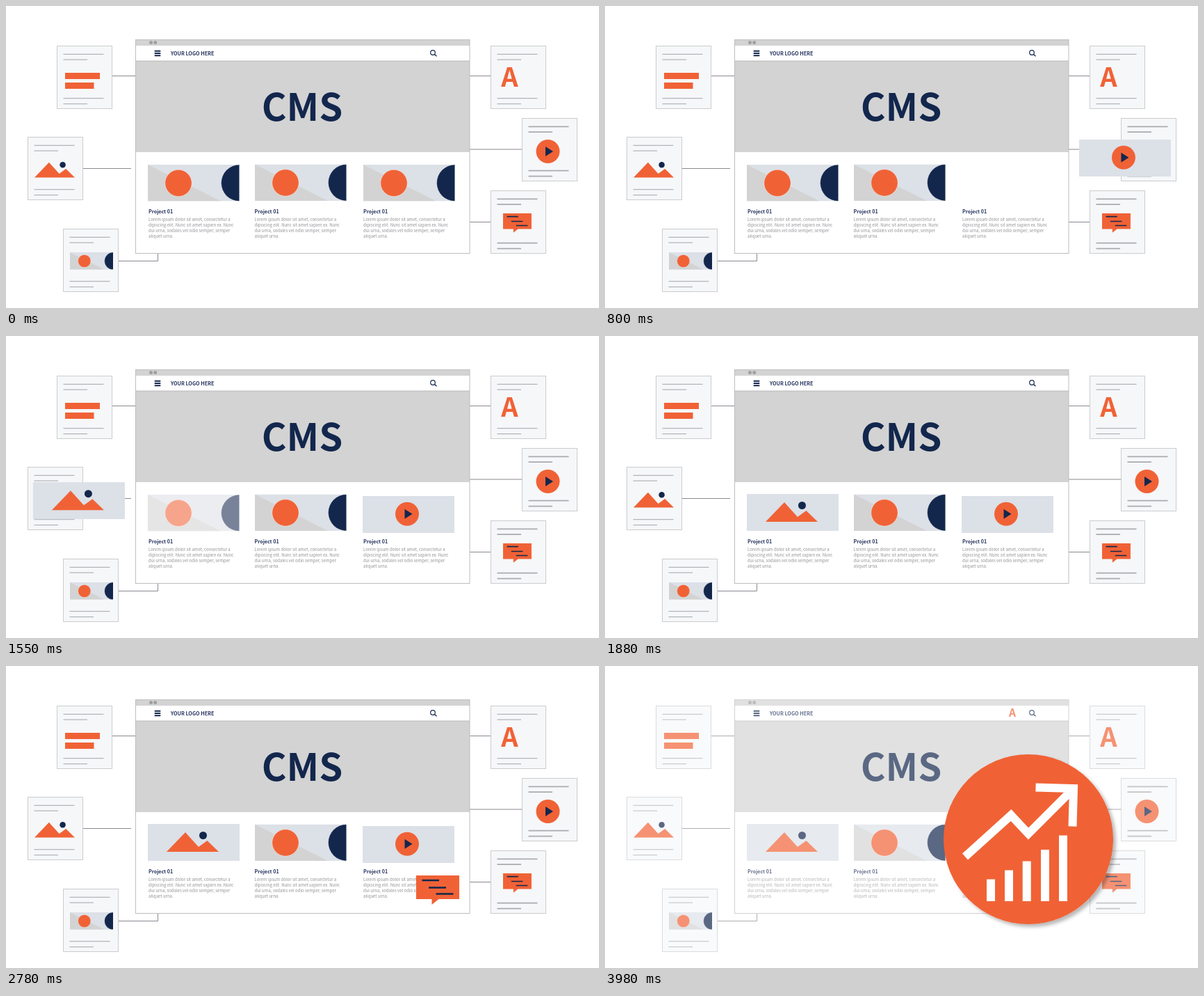
An HTML page that plays this animation: 853 px wide and 434 px high, repeating every 5010 ms.

```html
<!DOCTYPE html>
<html lang="en">
<head>
<meta charset="utf-8">
<title>CMS modules</title>
<style>
  html, body { margin: 0; width: 100%; height: 100%; overflow: hidden; background: #fff; }
  svg { display: block; width: 100%; height: 100%; }
  text { font-family: "Noto Sans CJK JP", "Noto Sans CJK SC", "Noto Sans CJK KR", "Noto Sans CJK", "Open Sans", sans-serif; }
  .bold { font-weight: 700; }
  .orange { fill: #f06236; }
  .navy { fill: #13274d; }
  .grey { fill: #d3d3d3; }
  .pale { fill: #dce0e7; }
  .ink { stroke: #13274d; fill: none; }
  .wire { stroke: #8b8890; fill: none; }
  .body { font-size: 6px; fill: #8f9094; }
  .name { font-size: 7.1px; fill: #26345f; }
</style>
</head>
<body>
<svg viewBox="0 0 853 434" preserveAspectRatio="none">
  <defs>
    <clipPath id="frame"><rect width="131.5" height="52.5"/></clipPath>
    <filter id="shadow" x="-10%" y="-10%" width="125%" height="125%">
      <feDropShadow dx="4" dy="4" stdDeviation="2.5" flood-color="#000" flood-opacity=".28"/>
    </filter>

    <g id="module" clip-path="url(#frame)">
      <rect class="pale" width="131.5" height="52.5"/>
      <path class="grey" d="M0 0L105 52.5H0z"/>
      <g stroke="#fff" stroke-opacity=".4">
        <circle class="orange" cx="44" cy="26.5" r="19.2"/>
        <circle class="navy" cx="131.8" cy="26.3" r="26.3"/>
      </g>
    </g>
    <g id="peaks">
      <path class="orange" d="M0 28L27 0L46 21L58.500 12L75 28z"/>
      <circle class="navy" cx="52.500" cy="4.500" r="5.500"/>
    </g>
    <g id="play">
      <circle class="orange" r="17"/>
      <path class="navy" d="M-3.500 -7L7.500 0L-3.500 7z"/>
    </g>
    <g id="bubble">
      <path class="orange" d="M0 0H62V34H32.500L22.500 42V34H0z"/>
      <path class="ink" stroke-width="2.400" d="M8.500 7H33M18 17.500H43M28.500 26.500H53.500"/>
    </g>
  </defs>

  <rect width="853" height="434" fill="#fff"/>
  <path class="wire" d="M153 100.500H186M111 233.500H180M162 366.500H218.500V355M667 100.500H697M667 206H742M667 310.500H697"/>

  <g id="window">
    <rect x="186.500" y="48.500" width="480.500" height="307" fill="#fff"/>
    <rect class="grey" x="186" y="48" width="481" height="9"/>
    <circle cx="208.500" cy="52.500" r="2.500" fill="#a0a0a1"/>
    <circle cx="214.700" cy="52.500" r="2.500" fill="#a0a0a1"/>
    <rect class="grey" x="186" y="79" width="481" height="131"/>
    <path d="M186 79H667" stroke="#b9b9ba"/>
    <rect x="186.500" y="48.500" width="480.500" height="307" fill="none" stroke="#bdbdbf"/>
    <path class="ink" stroke-width="2" d="M213.700 64.800H222.300M213.700 68H222.300M213.700 71.200H222.300"/>
    <text class="bold" x="237" y="70.500" font-size="7.2" fill="#26345f">YOUR LOGO HERE</text>
    <circle class="ink" cx="614" cy="67" r="3.300" stroke-width="1.200"/>
    <path class="ink" stroke-width="1.300" d="M616.500 69.500L619.500 72.300"/>
    <text class="bold navy" x="426" y="165" font-size="54.6" text-anchor="middle">CMS</text>
  </g>

  <g id="projects"></g>
  <g id="pages"></g>

  <use href="#bubble" transform="translate(715 298) scale(.66)"/>
  <use href="#play" x="779.500" y="209"/>
  <use href="#peaks" transform="translate(41 224.800) scale(.773)"/>
  <use href="#module" transform="translate(92 354) scale(.4715)"/>
  <path class="orange" d="M85 96H135V105H85zM85 110H126.500V119H85z"/>
  <text class="bold orange" x="724.500" y="116" font-size="38" text-anchor="middle">A</text>

  <g id="video">
    <rect class="pale" width="132" height="53"/>
    <use href="#play" x="64" y="25.700"/>
  </g>
  <g id="image">
    <rect class="pale" width="132" height="53"/>
    <use href="#peaks" x="27" y="12"/>
  </g>
  <g id="comment"><use href="#bubble"/></g>
  <g id="letter"><text class="bold orange" y="5.500" font-size="15.5" text-anchor="middle">A</text></g>

  <rect id="veil" width="853" height="434" fill="#fff" opacity=".3"/>
  <g id="growth">
    <circle class="orange" cx="609" cy="249" r="122" filter="url(#shadow)"/>
    <path fill="#fff" d="M549 306.500h12V338h-12zM575 293.500h12V338h-12zM600.700 280.500h12V338h-12zM627 264h12V338h-12zM653 243.500h12V338h-12z"/>
    <path fill="none" stroke="#fff" stroke-width="12" d="M518 274L584 214.500L609 241L672 178M619.500 174.500L674 176L672.500 230.500"/>
  </g>
</svg>
<script>
const LOOP = 5010;
const byId = id => document.getElementById(id);

const COPY = [
  "Lorem ipsum dolor sit amet, consectetur a",
  "dipiscing elit. Nunc sit amet sapien ex. Nunc",
  "dui urna, sodales vel odio semper, semper",
  "aliquet urna."
];

// Project columns: picture x, picture y, text x
const columns = [[204, 228, 205], [358, 227.5, 357.5], [514, 228, 514]];
byId("projects").innerHTML = columns.map(([x, y, tx], i) =>
  `<use id="pic${i}" href="#module" x="${x}" y="${y}"/>` +
  `<text class="bold name" x="${tx}" y="297.5">Project 01</text>` +
  COPY.map((line, n) => `<text class="body" x="${tx}" y="${308.5 + 8 * n}">${line}</text>`).join("")
).join("");

// Side pages: x, y, heavy lines
const sheets = [[73, 57], [31, 188], [82, 320], [697, 57], [742, 161, true], [697, 265, true]];
byId("pages").innerHTML = sheets.map(([x, y, heavy]) =>
  `<g transform="translate(${x} ${y})">` +
  `<rect x=".5" y=".5" width="79" height="90" fill="#f6f7f9" stroke="#cbccce"/>` +
  `<path stroke="${heavy ? "#a9abae" : "#b2b5b8"}" stroke-width="${heavy ? 1.8 : 1.2}" ` +
  `d="M9.500 12.300H67.500M9.500 20.200H44M9.500 75.600H67.500M9.500 83.600H44"/></g>`
).join("");

// Travelling parts: first shown, motion start, motion end, from, to
const trips = [
  { el: byId("video"), show: 640, start: 645, end: 1205, from: [713, 185], to: [513, 230] },
  { el: byId("image"), show: 1400, start: 1421, end: 1884, from: [8, 207], to: [204, 227] },
  { el: byId("comment"), show: 2350, start: 2350, end: 2780, from: [708, 294], to: [590, 301] },
  { el: byId("letter"), show: 2950, start: 2950, end: 3350, from: [711, 103.5], to: [586, 67.5] }
];

const ramp = (t, a, b) => Math.min(1, Math.max(0, (t - a) / (b - a)));
const ease = p => p < .5 ? 2 * p * p : 1 - 2 * (1 - p) * (1 - p);
const show = (el, on) => el.setAttribute("visibility", on ? "visible" : "hidden");

function draw(t) {
  byId("pic2").setAttribute("opacity", 1 - ramp(t, 340, 760));
  byId("pic0").setAttribute("opacity", 1 - ramp(t, 1370, 1790));
  for (const { el, show: at, start, end, from, to } of trips) {
    const p = ease(ramp(t, start, end));
    const [x, y] = from.map((v, i) => v + (to[i] - v) * p);
    el.setAttribute("transform", `translate(${x.toFixed(2)} ${y.toFixed(2)})`);
    show(el, t >= at);
  }
  show(byId("veil"), t >= 3680);
  show(byId("growth"), t >= 3980);
}

const began = performance.now();
function tick() {
  draw((performance.now() - began) % LOOP);
  requestAnimationFrame(tick);
}
draw(0);
requestAnimationFrame(tick);
</script>
</body>
</html>
```
